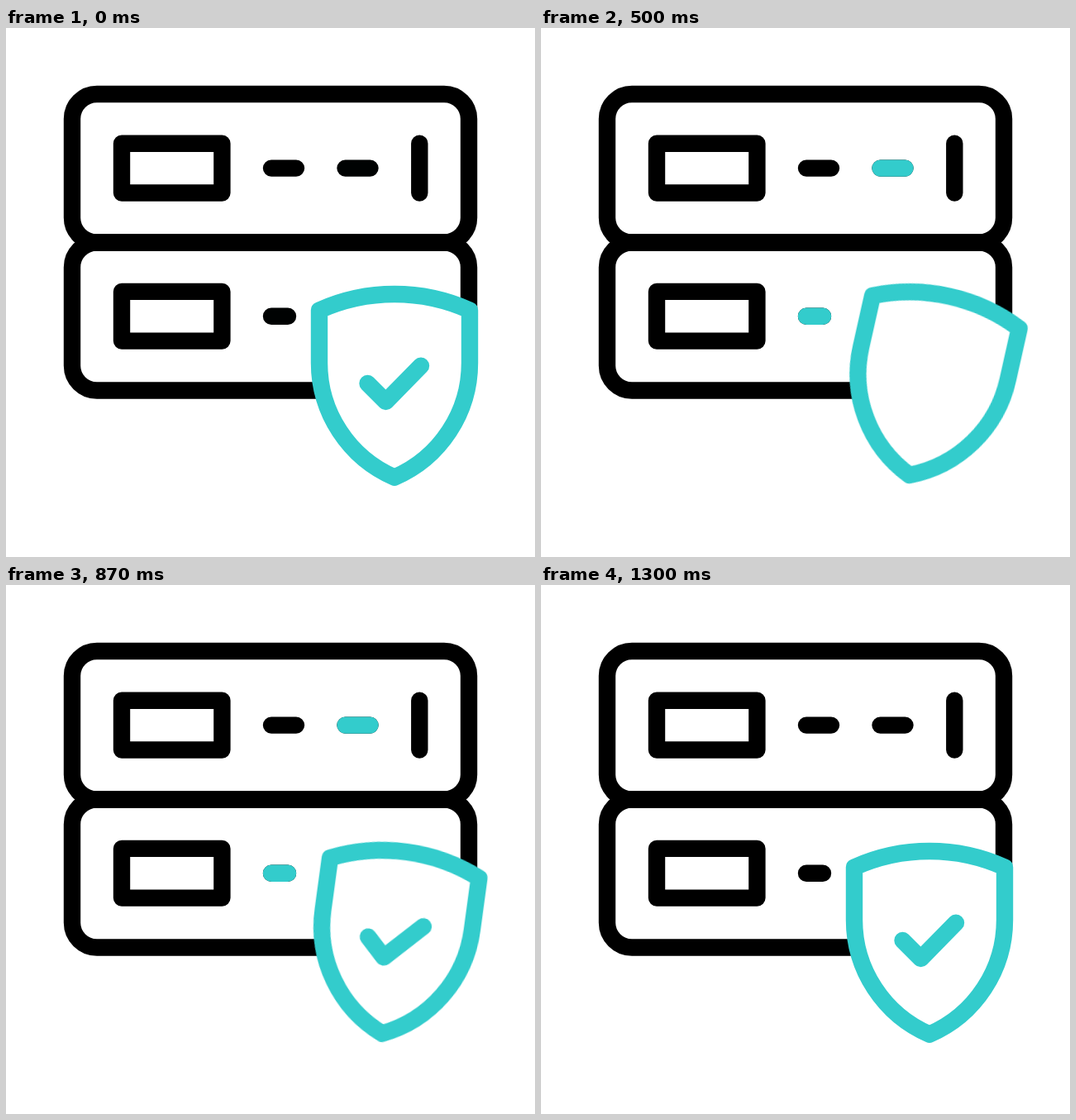
Recreate the animation shown at these times as an HTML page without scripts. Size 640x640 px, loop 1.67 s.

```html
<!DOCTYPE html>
<html lang="en">
<head>
<meta charset="utf-8">
<title>Protected server</title>
<style>
  :root { --loop: 1670ms; --ease: cubic-bezier(.333, 0, .667, 1); }
  html, body { margin: 0; width: 100%; height: 100%; overflow: hidden; background: #fff; }
  svg { display: block; width: 100%; height: 100%; }

  .line {
    fill: none;
    stroke: #000;
    stroke-width: 20.4;
    stroke-linecap: round;
    stroke-linejoin: round;
  }
  .teal { stroke: #3cc; }

  .lights { animation: glow var(--loop) linear infinite; }
  .shield {
    transform-origin: 470px 432.5px;
    animation: swing var(--loop) var(--ease) infinite;
  }
  .body { fill: #fff; }
  .check {
    stroke-dasharray: 1 2;
    animation: draw var(--loop) var(--ease) infinite,
               hide var(--loop) step-end infinite;
  }

  @keyframes glow {
    0%, 67.5%, 100% { opacity: 0; }
    0% { opacity: 0; }
    7.5%, 66% { opacity: 1; }
    76.8%, 100% { opacity: 0; }
    67.5% { opacity: 1; }
  }
  /* A damped swing that settles before the pause */
  @keyframes swing {
    0%, .5% { transform: rotate(0deg); }
    25% { transform: rotate(27deg); }
    37.9% { transform: rotate(-16deg); }
    50.9% { transform: rotate(8deg); }
    63.9% { transform: rotate(-2deg); }
    76.8%, 100% { transform: rotate(0deg); }
  }
  @keyframes draw {
    0%, 4.5% { stroke-dashoffset: 0; }
    25%, 31.9% { stroke-dashoffset: 1; }
    45.9%, 100% { stroke-dashoffset: 0; }
  }
  /* Removes the round cap left by an empty dash */
  @keyframes hide {
    0% { opacity: 1; }
    25% { opacity: 0; }
    32% { opacity: 1; }
  }
</style>
</head>
<body>
<svg viewBox="0 0 640 640">
  <g class="line">
    <rect x="80" y="80" width="480" height="179.5" rx="30"/>
    <rect x="80" y="259.5" width="480" height="179" rx="30"/>
    <rect x="140" y="139.8" width="121.4" height="59.7"/>
    <rect x="140" y="318.9" width="121.4" height="59.7"/>
    <path d="M321 169.6h30M410.5 169.6h30M500.3 139.8v59.7M321 348.7h20"/>
  </g>
  <path class="line teal lights" d="M410.5 169.6h30M321 348.7h20"/>
  <g class="shield">
    <path class="line teal body" d="M379 341.5A222 222 0 0 1 561 341.5V405A151 151 0 0 1 470 543.7A151 151 0 0 1 379 405Z"/>
    <path class="line teal check" pathLength="1" d="M437.5 430L459.5 452L502 408.7"/>
  </g>
</svg>
</body>
</html>
```
